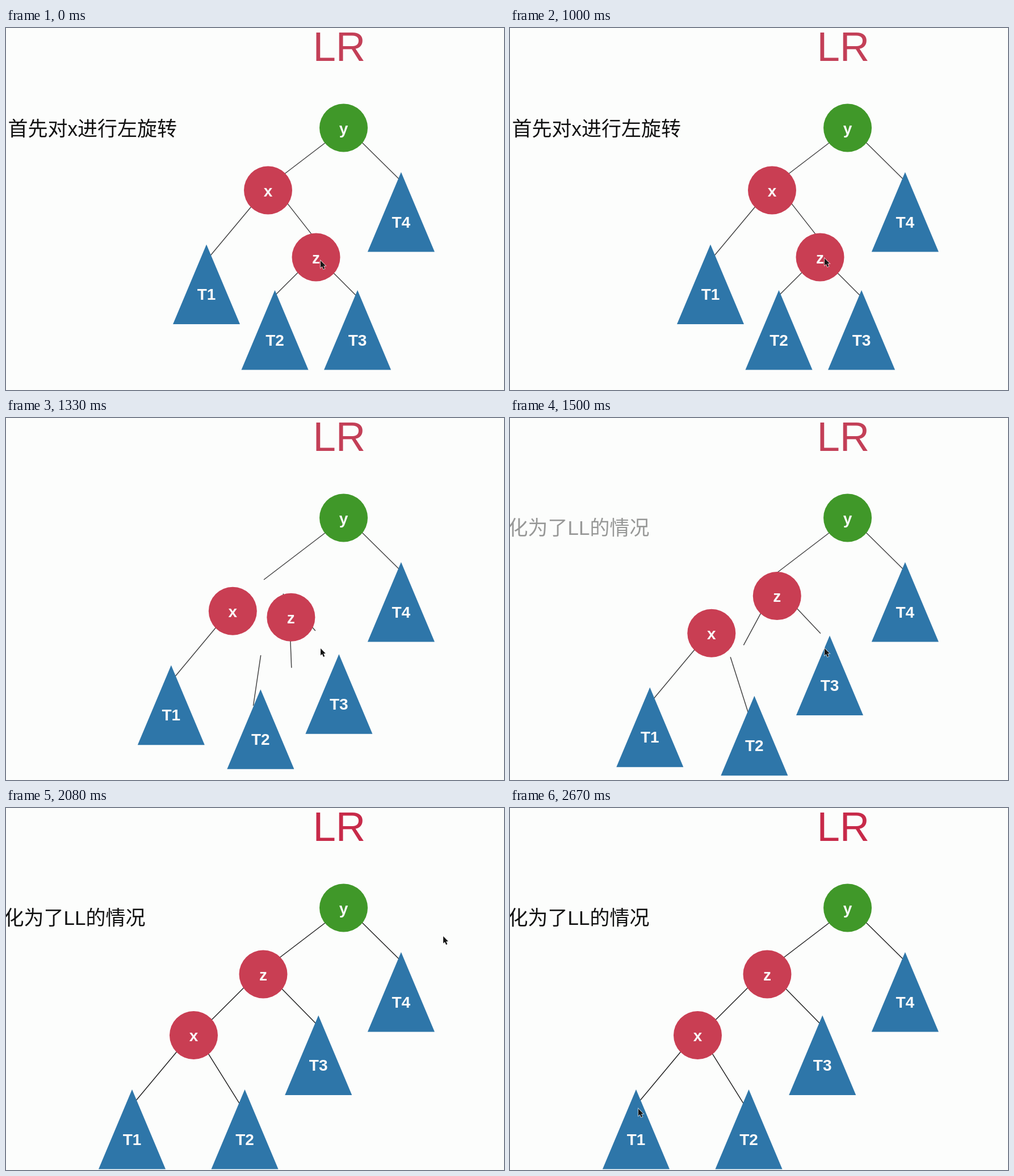
Write an HTML page with a canvas that moves like this. It is 877 px wide and 638 px high and loops after 2.76 s.

```html
<!DOCTYPE html>
<html lang="zh-CN">
<head>
<meta charset="utf-8">
<title>LR</title>
<style>
html, body { margin: 0; width: 100%; height: 100%; overflow: hidden; background: #fcfdfc; }
canvas { display: block; }
</style>
</head>
<body>
<canvas id="stage" width="877" height="638"></canvas>
<script>
const ctx = document.getElementById('stage').getContext('2d');
const LOOP = 2760, STEP = 250 / 3, LAST_STEP = 32;
const RED = '#c93e53', GREEN = '#409829', BLUE = '#2e76a9';
const SANS = '"Liberation Sans", Arial, "Noto Sans CJK SC", "Noto Sans CJK", sans-serif';

// Each position runs from its place before the rotation to its place after it.
const circles = [
  { label: 'y', color: GREEN, from: [594.5, 176] },
  { label: 'x', color: RED, from: [461.5, 286], to: [330.5, 400.5] },
  { label: 'z', color: RED, from: [546, 404], to: [453, 293] }
];
const triangles = [
  { label: 'T1', from: [353, 381.5], to: [222, 496] },
  { label: 'T2', from: [473.5, 462], to: [420.5, 496] },
  { label: 'T3', from: [619, 462], to: [550.2, 365.5] },
  { label: 'T4', from: [695.8, 254] }
];
// Edges turn about their midpoint while their length changes (angles in degrees).
const edges = [
  { from: [517, 336.5], to: [515.5, 349], angle: [51.9, 45.5], length: [81, 93] },
  { from: [495, 450], to: [383.5, 476.5], angle: [135, 58], length: [68, 114] },
  { from: [598, 453], to: [394, 341.5], angle: [45, 135], length: [72, 90] },
  { from: [398, 355.5], to: [267, 470], angle: [129.8, 129.8], length: [131, 131] }
];
const cursorPath = [
  [0, 554, 410], [500, 551, 404], [1000, 554, 406], [1750, 554, 406],
  [2080, 770, 226], [2250, 770, 226], [2640, 226, 530], [LOOP, 226, 530]
];

const clamp = v => Math.min(1, Math.max(0, v));
const mix = (a, b, p) => a + (b - a) * p;
const ramp = (t, start, end) => clamp((t - start) / (end - start));
const ease = u => u * u * (3 - 2 * u);
const place = ({ from, to = from }, p) => [mix(from[0], to[0], p), mix(from[1], to[1], p)];

function text(str, x, y, font, color, align = 'center', alpha = 1) {
  ctx.globalAlpha = alpha;
  ctx.font = `${font} ${SANS}`;
  ctx.fillStyle = color;
  ctx.textAlign = align;
  ctx.fillText(str, x, y);
  ctx.globalAlpha = 1;
}

function line(x1, y1, x2, y2) {
  ctx.beginPath();
  ctx.moveTo(x1, y1);
  ctx.lineTo(x2, y2);
  ctx.stroke();
}

function polygon(points, x, y) {
  ctx.beginPath();
  points.forEach(([dx, dy]) => ctx.lineTo(x + dx, y + dy));
  ctx.closePath();
}

function drawEdge(edge, p) {
  const [x, y] = place(edge, p);
  const angle = mix(...edge.angle, p) * Math.PI / 180;
  const half = mix(...edge.length, p) / 2;
  const dx = Math.cos(angle) * half, dy = Math.sin(angle) * half;
  line(x - dx, y - dy, x + dx, y + dy);
}

function drawCircle(node, p) {
  const [x, y] = place(node, p);
  ctx.fillStyle = node.color;
  ctx.beginPath();
  ctx.arc(x, y, 42.5, 0, Math.PI * 2);
  ctx.fill();
  text(node.label, x, y + 10.5, 'bold 28px', '#fafafa');
}

function drawTriangle(node, p) {
  const [x, y] = place(node, p);
  ctx.fillStyle = BLUE;
  polygon([[0, 0], [59, 140.5], [-59, 140.5]], x, y);
  ctx.fill();
  text(node.label, x, y + 97.5, 'bold 28px', '#fafafa');
}

function drawCursor(t) {
  const i = cursorPath.findIndex((key, n) => n && t <= key[0]);
  const a = cursorPath[i - 1], b = cursorPath[i];
  const p = ease(ramp(t, a[0], b[0]));
  polygon([[0, 0], [0, 12.5], [2.8, 10], [5, 15], [7.2, 14], [5.1, 9.2], [8.8, 9]],
    mix(a[1], b[1], p), mix(a[2], b[2], p));
  ctx.strokeStyle = 'rgba(255,255,255,.75)';
  ctx.lineWidth = 1.6;
  ctx.stroke();
  ctx.fillStyle = '#151515';
  ctx.fill();
}

function draw(t) {
  const p = ease(ramp(t, 1000, 1690));
  const settled = t > 1800;
  ctx.fillStyle = '#fcfdfc';
  ctx.fillRect(0, 0, 877, 638);

  text('LR', 540.5, 58, '72.5px', settled ? '#c72a49' : '#c33f57', 'left');
  text('首先对x进行左旋转', 3.5, 189.5, '35px', '#111', 'left', 1 - ramp(t, 1000, 1300));
  text('转化为了LL的情况', 245.5, 206, '35px', '#111', 'right', ramp(t, 1380, 1660));

  ctx.strokeStyle = settled ? '#222' : '#444';
  ctx.lineWidth = 1.5;
  line(594, 178, 454, 285);
  line(615, 190, 694, 268);
  edges.forEach(edge => drawEdge(edge, p));
  circles.forEach(node => drawCircle(node, p));
  triangles.forEach(node => drawTriangle(node, p));
  drawCursor(t);
}

const start = performance.now();
function tick() {
  const t = (performance.now() - start) % LOOP;
  draw(Math.min(LAST_STEP, Math.floor((t + 4) / STEP)) * STEP);
  requestAnimationFrame(tick);
}
tick();
</script>
</body>
</html>
```
